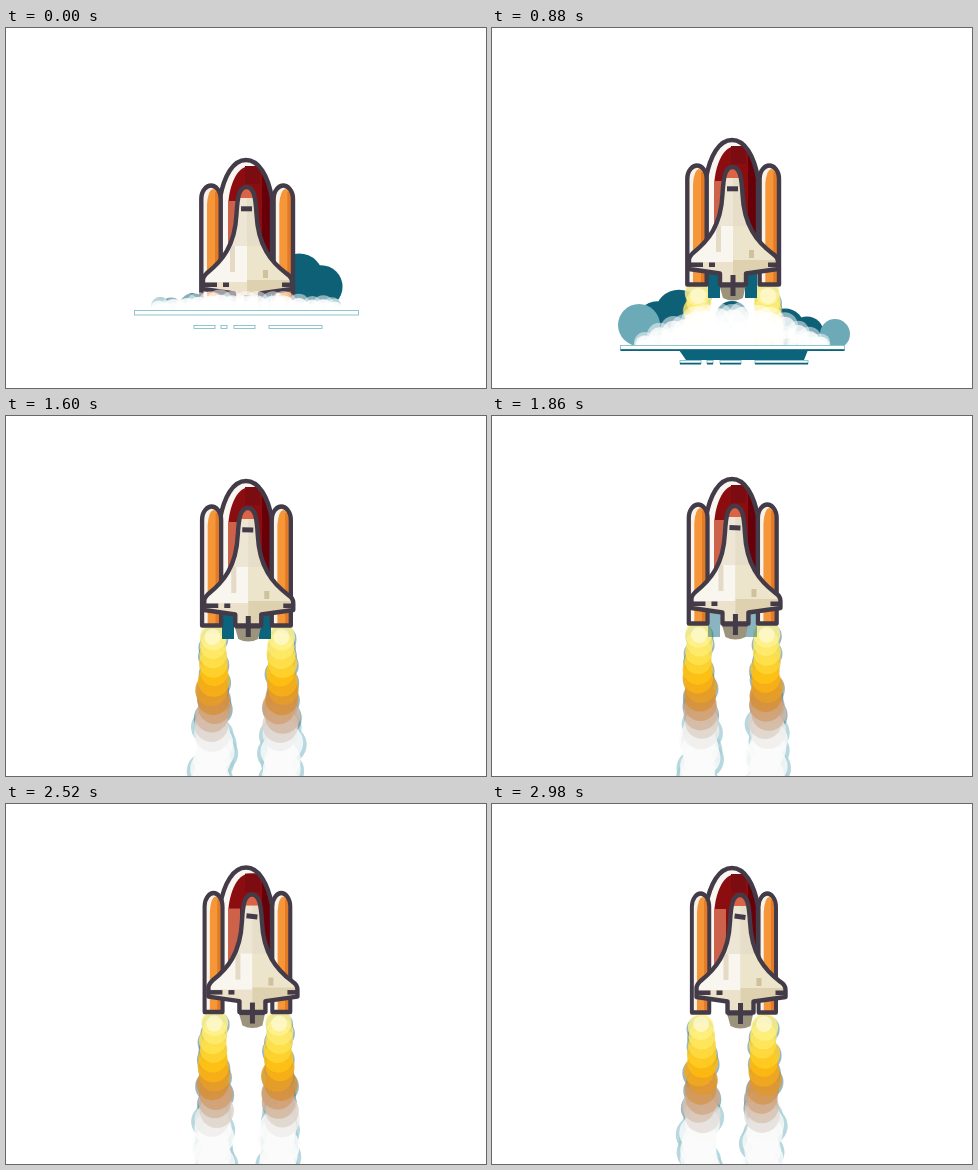
Write an HTML page with a canvas that moves like this. It is 480 px wide and 360 px high and loops after 3000 ms.

```html
<!DOCTYPE html>
<html lang="en">
<head>
<meta charset="utf-8">
<title>Shuttle launch</title>
<style>
html, body { margin: 0; width: 100%; height: 100%; overflow: hidden; background: #fff; }
canvas { display: block; }
</style>
</head>
<body>
<canvas id="stage" width="480" height="360"></canvas>
<script>
const ctx = document.getElementById('stage').getContext('2d');
const LOOP = 3000, STEP = 20, LIFT = 880, MID = 240;
const INK = '#443b49', TEAL = '#0c647c';

const clamp = (v, a = 0, b = 1) => Math.max(a, Math.min(b, v));
const mix = (a, b, u) => a + (b - a) * u;

function noise(n) {
  const s = Math.sin(n * 127.1 + 3.7) * 43758.5453;
  return s - Math.floor(s);
}

// Smooth curve through [time, value] points
function track(keys) {
  const slope = i => {
    const a = keys[Math.max(0, i - 1)], b = keys[Math.min(keys.length - 1, i + 1)];
    return (b[1] - a[1]) / (b[0] - a[0]);
  };
  return t => {
    let i = 0;
    while (i < keys.length - 2 && t > keys[i + 1][0]) i++;
    const [t0, a] = keys[i], [t1, b] = keys[i + 1];
    const d = t1 - t0, u = (t - t0) / d, u2 = u * u, u3 = u2 * u;
    return a * (2 * u3 - 3 * u2 + 1) + slope(i) * d * (u3 - 2 * u2 + u)
      + b * (3 * u2 - 2 * u3) + slope(i + 1) * d * (u3 - u2);
  };
}

const tipY = track([[0, 130], [540, 121], [880, 110], [1320, 77.5], [1600, 63], [2120, 61.5], [3000, 62]]);
const groundY = t => 285 + 35 * (t / LIFT) ** 2;
const turn = t => Math.max(0, t - 1320) / 210;

function disc(x, y, r, color, alpha = 1) {
  ctx.globalAlpha = alpha;
  ctx.fillStyle = color;
  ctx.beginPath();
  ctx.arc(x, y, r, 0, 7);
  ctx.fill();
  ctx.globalAlpha = 1;
}

function box(x, y, w, h, color) {
  ctx.fillStyle = color;
  ctx.fillRect(x, y, w, h);
}

function shape(path, color) {
  ctx.fillStyle = color;
  ctx.fill(path);
}

function inked(path, fill, paint) {
  shape(path, fill);
  ctx.save();
  ctx.clip(path);
  paint();
  ctx.restore();
  ctx.strokeStyle = INK;
  ctx.lineWidth = 4.4;
  ctx.lineJoin = 'round';
  ctx.stroke(path);
}

const tank = new Path2D('M-26 122V40C-22 18-13 2 0 2S22 18 26 40V122Z');
const tankRed = new Path2D('M-18 122V52C-18 30-10 8 4 8H28V122Z');
const booster = new Path2D('M-9.7 146.5V41C-9.7 32-4 27.5 0 27.5S9.7 32 9.7 41V146.5Z');
const boosterSide = new Path2D('M-4 150V46Q-3 32 2 31L10 34V150Z');
const orbiter = new Path2D('M0.5 29C8 29 9.5 39 10.5 56C12 88 25 104 41 116Q46 119 46 124V131L14 135.5V146.5H-12V135.5L-43 131V122Q-43 119-39 115C-24 103-11 88-9.5 56C-8.5 39-7 29 0.5 29Z');
const bell = new Path2D('M-13 146H14L11 160Q1 165-9 160Z');

function drawTank() {
  inked(tank, '#faf6f2', () => {
    shape(tankRed, '#8c0d10');
    box(-1, 8, 15, 18, '#7a0c12');
    box(16, 8, 10, 120, '#680009');
    box(-18, 43, 12, 80, '#cd624a');
  });
}

function drawBooster(x, slim) {
  ctx.save();
  ctx.translate(x, 0);
  ctx.scale(slim, 1);
  inked(booster, '#f8f3ea', () => {
    shape(boosterSide, '#f59639');
    box(4, 34, 6, 115, '#e27a28');
  });
  ctx.restore();
}

function drawOrbiter(tilt) {
  shape(bell, '#9b937c');
  inked(orbiter, '#ede6d5', () => {
    box(1, 40, 15, 110, '#e6dec8');
    box(-45, 88, 46, 40, '#f9f6ef');
    box(1, 88, 45, 34, '#ede4cc');
    box(-45, 124, 46, 24, '#ece2cb');
    box(1, 122, 46, 26, '#ddd1b0');
    box(-16, 88, 5, 26, '#e4dac5');
    box(17, 112, 5, 8, '#cfc19c');
    box(-12, 28, 26, 12, '#dd6347');
  });
  ctx.save();
  ctx.translate(0.5, 50.8);
  ctx.rotate(tilt);
  box(-5.5, -2.5, 11, 5, INK);
  ctx.restore();
  box(-42, 124.5, 13, 4.5, INK);
  box(-23, 124.5, 6, 4.5, INK);
  box(36, 124.5, 9, 4.5, INK);
  box(-1.5, 137, 5, 21, INK);
  box(-12, 145, 25, 4.5, INK);
}

function drawRocket(t, y) {
  const s = turn(t), slim = 1 - s * 0.013;
  ctx.save();
  ctx.translate(MID, y);
  ctx.globalAlpha = clamp((2100 - t) / 500);
  box(-24, 134, 12, 26, TEAL);
  box(13, 134, 12, 26, TEAL);
  ctx.globalAlpha = 1;
  drawTank();
  drawBooster(-35 + s * 0.45, slim);
  drawBooster(37.3 - clamp((t - LIFT) / 300, 0, 2), slim);
  ctx.translate(s * 0.95, 0);
  drawOrbiter(s * 0.017);
  ctx.restore();
}

// Exhaust cools from pale yellow through orange and tan to white
function heat(d) {
  const hue = 54 - 28 * clamp(d / 80) ** 1.5;
  const sat = 100 * (1 - clamp((d - 45) / 60));
  const light = 80 - 27 * clamp(d / 40) + 46 * clamp((d - 65) / 40);
  return `hsl(${hue}, ${sat}%, ${light}%)`;
}

function drawJet(t, x, y, seed) {
  const speed = 0.2, gap = 44, begin = 480, puffs = [];
  const last = Math.floor((t - begin) / gap);
  for (let i = Math.max(0, last - 26); i <= last; i++) {
    const d = (t - begin - i * gap) * speed, n = noise(i + seed);
    puffs.push({
      d,
      x: x + (noise(i + seed + 40) - 0.5) * (2 + d * 0.05),
      y: y + 10 + d,
      r: 12 + Math.min(d, 110) * 0.05 + n * 1.5,
      lean: n < 0.5 ? -1 : 1
    });
  }
  for (const p of puffs) {
    const cool = p.d > 88;
    disc(p.x + p.lean * (cool ? 3 : 1), p.y + 2, p.r + 0.5, cool ? '#a6cfd6' : '#397080', cool ? 0.8 : 0.5);
  }
  for (const p of puffs) disc(p.x, p.y, p.r, heat(p.d), 0.82);
  if (t > begin) disc(x, y + 14, 8, '#fffbe0', 0.65);
}

// Teal smoke: a mound, then one paler puff, on each side of the pad
function drawShade(t, g) {
  const k = clamp(t / LIFT), fade = clamp((t - LIFT) / 440);
  const dark = `hsl(193, ${mix(79, 36, fade)}%, ${mix(26, 48, fade)}%)`;
  disc(MID - 7 * fade, g - 6 - 24 * k - 12 * fade, 9 + 8 * k, dark);
  for (const side of [-1, 1]) {
    const size = (side < 0 ? mix(5, 34, k) : mix(35, 20, k)) * (1 - fade * 0.6);
    for (let j = 0; j < 2; j++) {
      disc(MID + side * (53 + 22 * j), g - size * (1 - 0.25 * j), 13 + size * 0.33 - 3 * j, dark);
    }
    disc(MID + 5 * k + side * (86 + 12 * k + 6 * fade), g - mix(7, 18.5 - 4.5 * side, k) + 4 * side * fade - 4 * fade,
      mix(9, 18 - 3 * side, k), `hsl(190, 34%, ${mix(57, 49, fade)}%)`);
  }
}

// White foam: puffs along a low arch that rises with the launch
function drawFoam(t, g) {
  const k = clamp(t / LIFT), n = 15;
  for (const row of [1, 0.4]) {
    for (let i = 0; i < n; i++) {
      const u = i / (n - 1), arch = Math.sin(Math.PI * u);
      const x = mix(155, 328, u) + (noise(i) - 0.5) * 6;
      const h = row * (5 + arch * mix(5, 26, k) + (noise(i + 30) - 0.5) * 5 * k);
      const r = 10 + arch * mix(3, 6, k) + (noise(i + 60) - 0.5) * 3;
      disc(x, g - h, r, '#fff', 0.5);
      disc(x, g - h + r * 0.2, r * 0.85, '#fff', 0.75);
    }
  }
}

function slab(x, y, w, h, k) {
  box(x, y, w, h, '#fff');
  ctx.strokeStyle = '#83bfca';
  ctx.lineWidth = 0.9;
  ctx.strokeRect(x, y, w, h);
  ctx.globalAlpha = k;
  box(x, y + h - 0.8, w, 1.8, TEAL);
  ctx.globalAlpha = 1;
}

function drawGround(t, g) {
  const k = clamp(t / 800);
  ctx.globalAlpha = k;
  shape(new Path2D(`M187 ${g + 2}H316L312 ${g + 12}H194Z`), TEAL);
  ctx.globalAlpha = 1;
  slab(128.5, g - 2.5, 224, 4.5, k);
  for (const [x, w] of [[188, 21], [215, 6], [228, 21], [263, 53]]) slab(x, g + 12.5, w, 3, k);
}

function render(t) {
  const y = tipY(t), g = groundY(t), s = turn(t);
  box(0, 0, 480, 360, '#fff');
  ctx.save();
  ctx.beginPath();
  ctx.rect(0, 0, 480, g);
  ctx.clip();
  const padVisible = g < 400;
  if (padVisible) drawShade(t, g);
  drawJet(t, 206 + s * 0.4, y + 144, 0);
  drawJet(t, 276 - s * 0.5, y + 144, 90);
  drawRocket(t, y);
  if (padVisible) drawFoam(t, g);
  ctx.restore();
  drawGround(t, g);
}

const start = performance.now();
function frame() {
  const t = (performance.now() - start) % LOOP;
  render(Math.floor(t / STEP) * STEP);
  requestAnimationFrame(frame);
}
frame();
</script>
</body>
</html>
```
